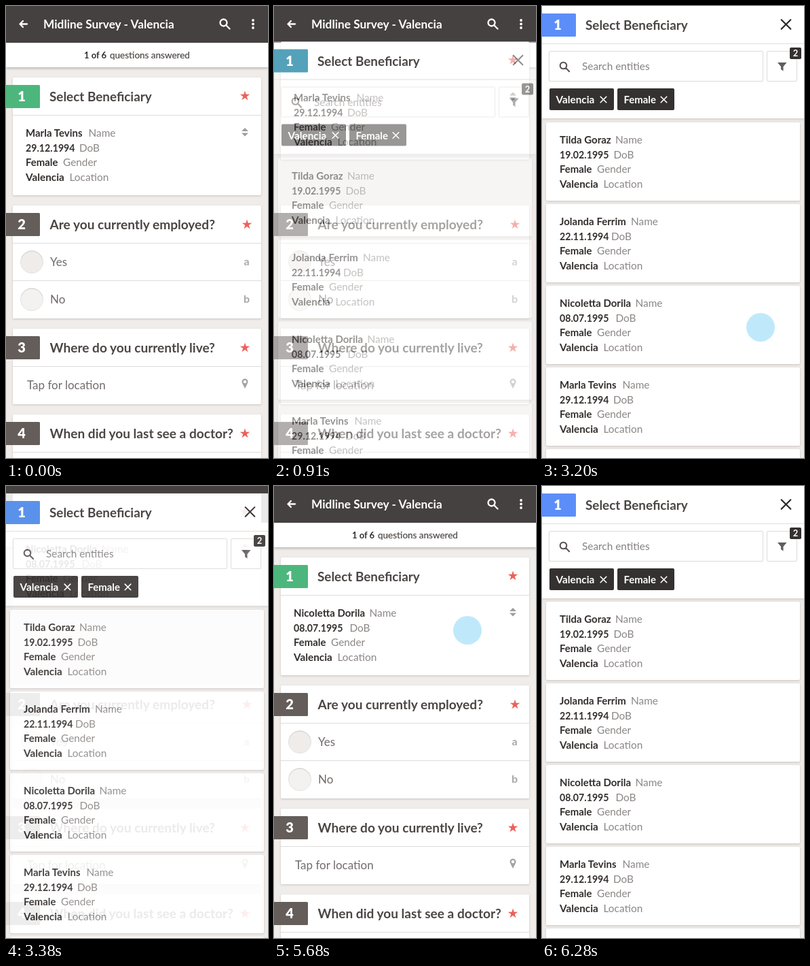
Write an HTML page that moves like this. It is 386 px wide and 664 px high and loops after 8 s.

```html
<!DOCTYPE html>
<html lang="en">
<head>
<meta charset="utf-8">
<title>Survey form</title>
<style>
html, body { margin: 0; width: 100%; height: 100%; overflow: hidden; background: #efecea; }
svg { display: block; width: 386px; height: 664px; font-family: Lato, "Open Sans", sans-serif; }
.card { fill: #fff; filter: drop-shadow(0 1px 1.5px rgba(70, 55, 45, .22)); }
.bar { fill: #fff; filter: drop-shadow(0 1px 2px rgba(60, 50, 45, .4)); }
.line { fill: #dfdddb; }
.box { fill: #fff; stroke: #dcdad9; }
.title { font-size: 19.1px; font-weight: 700; fill: #4b4644; }
.key { font-weight: 700; fill: #322e2c; }
.label { font-size: 15.4px; fill: #8b8785; }
.field { font-size: 17px; fill: #716c6a; }
.hint { font-size: 15.4px; fill: #858180; }
.letter { font-size: 16px; font-weight: 700; fill: #aaa7a5; text-anchor: middle; }
.num { font-size: 20px; font-weight: 900; fill: #fff; text-anchor: middle; }
.white { font-weight: 700; fill: #fff; }
.stroke { fill: none; stroke-linecap: round; stroke-linejoin: round; }
</style>
</head>
<body>
<svg id="stage" viewBox="0 0 386 664" xmlns="http://www.w3.org/2000/svg"></svg>
<script>
const LOOP = 8000, STEP = 60;
const GREEN = '#4db67c', BLUE = '#5c8ef9', BROWN = '#645d5a', DARK = '#353130';

// name, birth date, offsets of the first two labels
const people = [
  ['Tilda Goraz', '19.02.1995', 82, 79.5],
  ['Jolanda Ferrim', '22.11.1994', 105, 76],
  ['Nicoletta Dorila', '08.07.1995', 111.5, 82.5],
  ['Marla Tevins', '29.12.1994', 92.5, 79]
];

const rect = (x, y, w, h, attrs) => `<rect x="${x}" y="${y}" width="${w}" height="${h}" ${attrs}/>`;
const text = (x, y, cls, str, size) =>
  `<text x="${x}" y="${y}" class="${cls}"${size ? ` style="font-size:${size}px"` : ''}>${str}</text>`;
const path = (d, color, width) => `<path class="stroke" d="${d}" stroke="${color}" stroke-width="${width}"/>`;
const group = (id, body) => `<g id="${id}">${body}</g>`;
const line = (x, y, w) => rect(x, y, w, 1, 'class="line"');
const card = (x, y, w, h) => rect(x, y, w, h, 'rx="2" class="card"');
const cross = (x, y, r, color, width) =>
  path(`M${x - r} ${y - r}L${x + r} ${y + r}M${x + r} ${y - r}L${x - r} ${y + r}`, color, width);
const lens = (x, y, r, color, width) =>
  path(`M${x + r} ${y}A${r} ${r} 0 1 1 ${x - r} ${y}A${r} ${r} 0 1 1 ${x + r} ${y}M${x + r * .75} ${y + r * .75}L${x + r * 1.8} ${y + r * 1.8}`, color, width);

function star(x, y) {
  const points = Array.from({ length: 10 }, (_, i) => {
    const r = i % 2 ? 2.9 : 7.6, a = Math.PI * (i / 5 - .5);
    return `${(x + r * Math.cos(a)).toFixed(2)},${(y + r * Math.sin(a)).toFixed(2)}`;
  });
  return `<polygon points="${points.join(' ')}" fill="#ec615b"/>`;
}

function badge(y, n, color) {
  return `<path d="M0 ${y}H48.500a1.500 1.500 0 0 1 1.500 1.500V${y + 32.5}a1.500 1.500 0 0 1 -1.500 1.500H0Z" fill="${color}"/>` +
    text(23, y + 24, 'num', n);
}

function record(x, y, [name, born, nameGap, bornGap]) {
  return [
    [name, 'Name', nameGap, 0, 15], [born, 'DoB', bornGap, 22, 14.2],
    ['Female', 'Gender', 55, 43, 14.9], ['Valencia', 'Location', 64.5, 65, 15.3]
  ].map(([value, label, gap, dy, size]) =>
    text(x, y + dy, 'key', value, size) + text(x + gap, y + dy, 'label', label)).join('');
}

function question(y, h, n, title, starX) {
  return card(10, y, 366, h) + line(10, y + 55, 366) + badge(y + 11, n, BROWN) +
    text(64.5, y + 35, 'title', title) + star(starX, y + 28);
}

function option(y, label, letter, color) {
  return `<circle cx="38" cy="${y}" r="16.500" fill="${color}" stroke="#e6e3e1"/>` +
    path(`M22.500 ${y - 5}A16.500 16.500 0 0 1 53.500 ${y - 5}`, '#d9d5d2', 1) +
    text(65, y + 6, 'field', label) + text(354.5, y + 5, 'letter', letter);
}

function form() {
  const dots = [21, 26.5, 32].map(y => `<circle cx="364" cy="${y}" r="1.900" fill="#fff"/>`).join('');
  return rect(0, 0, 386, 664, 'fill="#efecea"') +
    rect(0, 53, 386, 37, 'class="bar"') + rect(0, 0, 386, 54, 'fill="#454140"') +
    path('M31 26.500H21M25 22L20.500 26.500L25 31', '#fff', 2.3) +
    text(55, 33, 'white', 'Midline Survey - Valencia', 17.3) +
    lens(320.5, 24.5, 5, '#fff', 2.3) + dots +
    text(115, 77, 'key', '1 of 6', 13) +
    `<text x="153" y="77" font-size="13.500" fill="#4b4644" stroke="#4b4644" stroke-width=".2">questions answered</text>` +
    question(293, 166, 2, 'Are you currently employed?', 355) +
    option(376, 'Yes', 'a', '#f0ece9') + line(10, 403, 366) + option(431, 'No', 'b', '#f3f2f1') +
    question(474, 111, 3, 'Where do you currently live?', 352) +
    text(31, 563, 'field', 'Tap for location') +
    `<circle cx="352" cy="552" r="3.400" fill="none" stroke="#a5a2a0" stroke-width="2.200"/>` +
    '<path d="M348.500 555L352 562L355.500 555Z" fill="#a5a2a0"/>' +
    question(600, 90, 4, 'When did you last see a doctor?', 352);
}

function answerCard() {
  return card(10, 105, 366, 173) + line(10, 160, 366) + badge(116, 1, GREEN) +
    text(64, 140, 'title', 'Select Beneficiary', 18.9) + star(352, 132) +
    '<path d="M347 184L352 179L357 184ZM347 186.500L352 191.500L357 186.500Z" fill="#a09d9b"/>' +
    group('before', record(29, 192, people[3])) + group('after', record(29, 192, people[2]));
}

function panel() {
  const cards = people.map((p, i) => card(6, 171 + i * 120, 374, 115) + record(26, 202 + i * 120, p)).join('');
  const chip = (x, w, label, size) => rect(x, 121, w, 32, `rx="2" fill="${DARK}"`) +
    text(x + 9.5, 143, 'white', label, size) + cross(x + w - 15.5, 137.5, 4.3, '#fff', 1.6);
  return rect(0, 0, 386, 664, 'fill="#eeebe9"') +
    group('list', cards + card(6, 651, 374, 115)) +
    rect(0, 0, 386, 165, 'class="bar" style="filter:drop-shadow(0 1px 2px rgba(60,50,45,.2))"') +
    badge(11, 1, BLUE) + text(64, 35, 'title', 'Select Beneficiary', 18.9) +
    cross(359.5, 27, 6.8, '#262322', 2.1) + line(0, 55, 386) +
    rect(10.5, 66.5, 315, 44, 'rx="1.5" class="box"') + lens(31.5, 87.5, 4.8, '#5b5654', 2.1) +
    text(59, 94, 'hint', 'Search entities') +
    rect(331.5, 66.5, 44, 44, 'rx="1.5" class="box"') +
    '<path d="M347 83H360.500L355.500 89V95.500L352 93V89Z" fill="#625d5b"/>' +
    rect(365, 61, 17, 17, `rx="2" fill="${DARK}"`) +
    `<text x="373.500" y="74" class="white" font-size="13" text-anchor="middle">2</text>` +
    chip(11, 95, 'Valencia', 15.3) + chip(111, 84, 'Female', 14.9);
}

const stage = document.getElementById('stage');
stage.innerHTML = form() + group('answer', answerCard()) + group('panel', panel()) +
  '<circle id="tap" r="21" fill="#bfe9fb"/>';
const el = id => document.getElementById(id);
const parts = Object.fromEntries(['answer', 'panel', 'list', 'before', 'after', 'tap'].map(id => [id, el(id)]));

const taps = [[500, 285, 212], [3200, 322, 472], [5680, 285, 212]];

// Stepped progress of a move, already one step in at its start
function progress(t, start, steps) {
  const p = Math.min(1, Math.max(0, (Math.floor((t - start) / STEP) + 1) / steps));
  return p * p * (3 - 2 * p);
}

function draw(t) {
  const open = progress(t, 790, 6) - progress(t, 3380, 5) + progress(t, 5980, 6);
  parts.answer.setAttribute('transform', `translate(0 ${-105 * open})`);
  parts.panel.setAttribute('transform', `translate(0 ${105 * (1 - open)})`);
  parts.panel.setAttribute('opacity', open);
  parts.panel.style.display = open > 0 ? '' : 'none';
  parts.list.setAttribute('transform', `translate(0 ${t > 5000 ? -1 : 0})`);
  parts.before.style.display = t < 3200 ? '' : 'none';
  parts.after.style.display = t < 3200 ? 'none' : '';

  const tap = taps.find(([start]) => t >= start && t < start + 3 * STEP);
  parts.tap.style.display = tap ? '' : 'none';
  if (tap) {
    const [start, x, y] = tap;
    parts.tap.setAttribute('cx', x);
    parts.tap.setAttribute('cy', y);
    parts.tap.setAttribute('opacity', 1 - Math.floor((t - start) / STEP) / 3);
  }
}

const begin = performance.now();
function tick() {
  draw((performance.now() - begin) % LOOP);
  requestAnimationFrame(tick);
}
tick();
</script>
</body>
</html>
```
